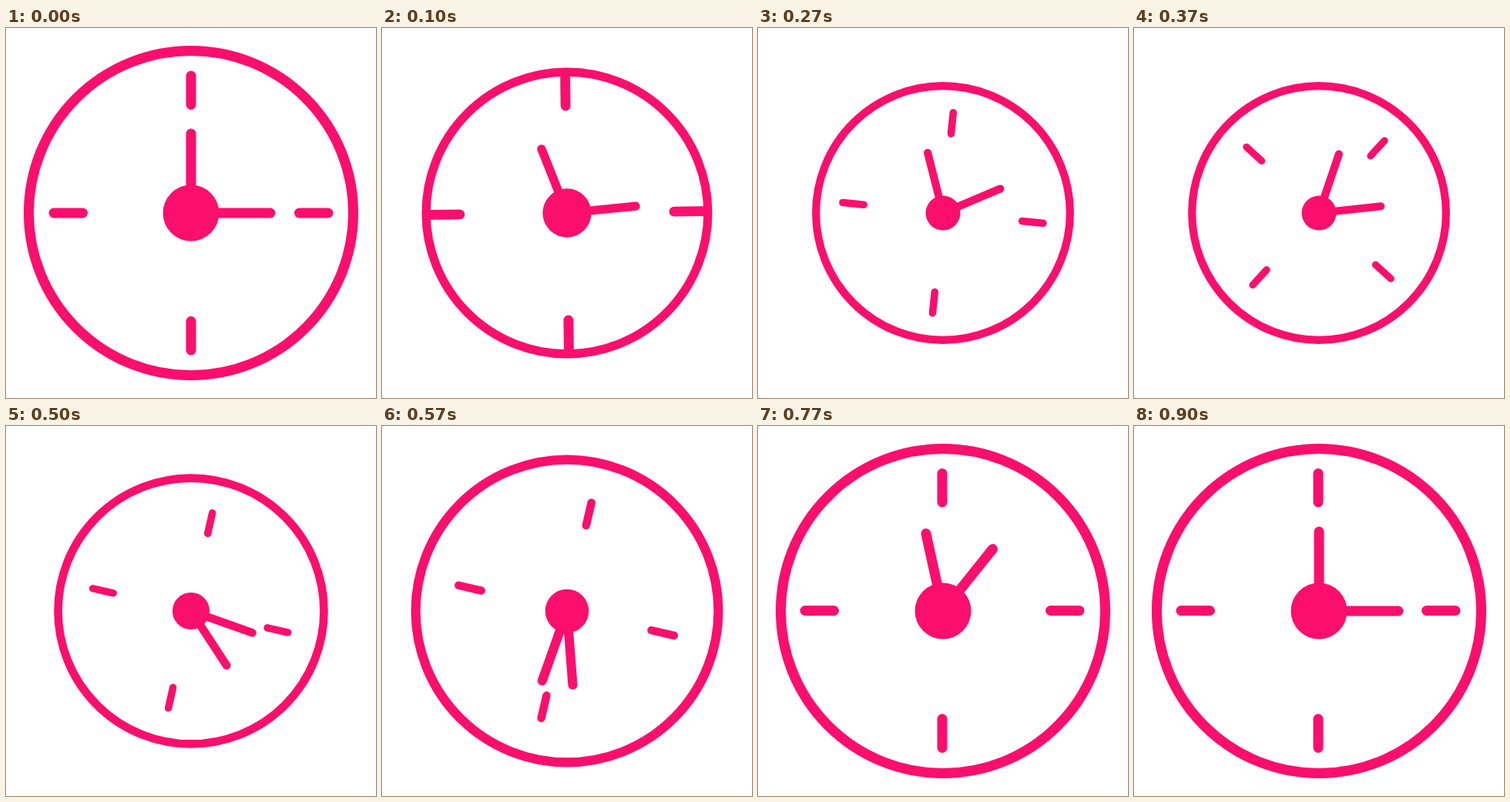
Write an HTML page that moves like this. It is 480x480 px and loops after 1530 ms.

```html
<!DOCTYPE html>
<html lang="en">
<head>
<meta charset="utf-8">
<title>Clock</title>
<style>
  html, body { margin: 0; width: 100%; height: 100%; overflow: hidden; background: #fff; }
  svg { display: block; width: 100vw; height: 100vh; }
  line, #ring { fill: none; stroke: #fb0f6c; stroke-width: 13; stroke-linecap: round; }
  #dot { fill: #fb0f6c; }
</style>
</head>
<body>
<svg viewBox="0 0 480 480">
  <g id="ticks">
    <line y1="-178" y2="-140.5"/>
    <line x1="140.5" x2="178"/>
    <line y1="140.5" y2="178"/>
    <line x1="-178" x2="-140.5"/>
  </g>
  <g id="face">
    <circle id="ring" r="210.5"/>
    <line id="handA" y2="-103"/>
    <line id="handB" y2="-103"/>
  </g>
  <circle id="dot" r="36.5"/>
</svg>
<script>
const LOOP = 1530, STEP = 100 / 3, LAST = 27;
const $ = id => document.getElementById(id);
const ticks = $('ticks'), face = $('face'), dot = $('dot');
const handA = $('handA'), handB = $('handB');

// Timing curve with control points (x1, 0) and (x2, 1).
function ease(x, x1, x2) {
  if (x <= 0) return 0;
  if (x >= 1) return 1;
  let lo = 0, hi = 1;
  for (let i = 0; i < 24; i++) {
    const u = (lo + hi) / 2, v = 1 - u;
    if (3 * u * v * v * x1 + 3 * u * u * v * x2 + u * u * u < x) lo = u;
    else hi = u;
  }
  return lo * lo * (3 - 2 * lo);
}

// Progress from step a to step b.
const span = (k, a, b, x1 = 1 / 3, x2 = 2 / 3) => ease((k - a) / (b - a), x1, x2);

// Scale that shrinks by depth, then recovers.
const pulse = (k, depth, a, b, c, d) => 1 - depth * (span(k, a, b) - span(k, c, d));

const handTurn = k => -24 * span(k, 0, 5, .33, .11) + 384 * span(k, 5, 25, .57, .668);

const tickTurn = k =>
  -3 * span(k, 2, 5) + 108 * span(k, 5, 16, .612, .62) - 15 * span(k, 16, 20.5);

function draw(ms) {
  const k = Math.min(LAST, Math.floor((ms % LOOP + 3.4) / STEP));
  const faceScale = pulse(k, .217, 0, 5.25, 13.6, 19);
  const dotScale = pulse(k, .383, -.3, 8, 13.2, 21.8);
  const tickScale = pulse(k, .288, 2.2, 9.2, 13.75, 22.25);
  face.setAttribute('transform', `translate(240 240) scale(${faceScale})`);
  dot.setAttribute('transform', `translate(240 240) scale(${dotScale})`);
  // The marks turn about a point slightly off their centre.
  ticks.setAttribute('transform',
    `translate(239.75 239.25) rotate(${tickTurn(k)}) scale(${tickScale}) translate(.25 .75)`);
  handA.setAttribute('transform', `rotate(${handTurn(k)})`);
  handB.setAttribute('transform', `rotate(${90 + handTurn(k - 2)})`);
}

const start = performance.now();
function tick() {
  draw(performance.now() - start);
  requestAnimationFrame(tick);
}
tick();
</script>
</body>
</html>
```
